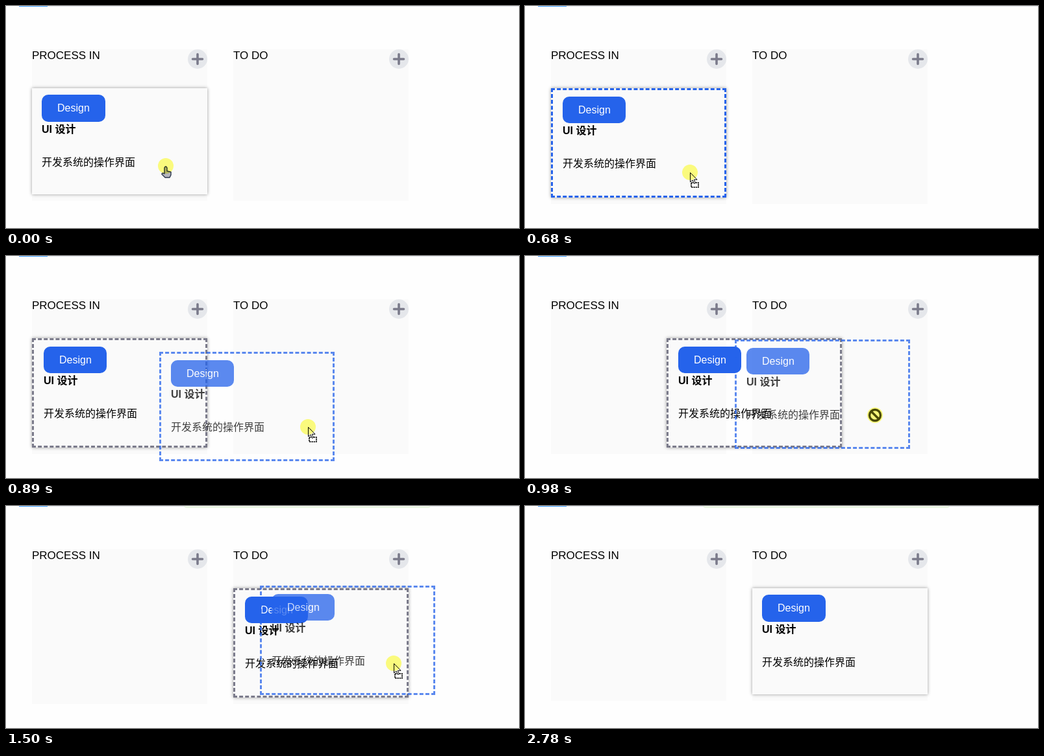
Animation, 790 px wide and 343 px high, one loop 3.24 s. Source, as an HTML page:

```html
<!DOCTYPE html>
<html lang="zh-CN">
<head>
<meta charset="utf-8">
<title>Kanban drag</title>
<style>
  html, body { margin: 0; width: 100%; height: 100%; overflow: hidden; background: #fefefe; }
  body { position: relative; font: 16px "Liberation Sans", Arial, "Noto Sans CJK SC", "Noto Sans CJK", sans-serif; }
  body > * { position: absolute; left: 0; top: 0; }
  svg { overflow: visible; }

  .rule { left: 20px; width: 770px; height: 1px; background: linear-gradient(90deg, #409eff 44px, #e4e7ed 44px); }
  .toast { left: 274px; top: -37px; width: 380px; height: 40px; box-sizing: border-box;
           background: #f0f9eb; border: 1px solid #e1f3d8; border-radius: 4px; }

  .column { top: 67px; width: 270px; height: 234px; background: #fafafa; }
  .column text { font-size: 17px; }
  .column circle { fill: #e5e7eb; }
  .column path { stroke: #7b7b8b; stroke-width: 3.6; stroke-linecap: round; }
  .lifted .column { height: 239px; }

  .card { width: 270px; height: 164px; box-sizing: border-box; box-shadow: 0 0 5px rgba(0, 0, 0, .4); }
  .card svg { position: absolute; left: 0; top: 0; }
  .card rect { fill: #2563eb; width: 98px; height: 42px; }
  .card .label { fill: #fff; }
  .card .title { font-weight: bold; }
  .lifted .card { height: 169px; border: 3px dashed #2563eb; }
  .lifted .card rect { width: 97px; height: 41px; }
  .lifted .card .copy { transform: translateY(-1px); }
  .lifted .card.placeholder { border-color: #7b7b8b; }
  .card.ghost { opacity: .75; box-shadow: none; }

  .halo { left: -12px; top: -12px; width: 24px; height: 24px; border-radius: 50%;
          background: #ffff80; mix-blend-mode: multiply; }
  .pointer > g { display: none; }
  .pointer[data-kind=hand] .hand,
  .pointer[data-kind=drag] .drag,
  .pointer[data-kind=deny] .deny,
  .pointer[data-kind=arrow] .arrow { display: inline; }
  .hand, .arrow { fill: #b4b5be; stroke: #28334a; stroke-width: 1.4; stroke-linejoin: round; }
  .drag { fill: #fff; stroke: #000; }
  .deny { fill: none; stroke: #4a4a10; stroke-width: 3.4; }
</style>
</head>
<body>
<div class="rule"></div>
<div class="column" style="left:40px"><svg width="270" height="60">
  <text y="15">PROCESS IN</text><circle cx="255" cy="15" r="15"/><path d="M247.5 15h15M255 7.500v15"/>
</svg></div>
<div class="column" style="left:350px"><svg width="270" height="60">
  <text y="15">TO DO</text><circle cx="255" cy="15" r="15"/><path d="M247.500 15h15M255 7.500v15"/>
</svg></div>
<div class="card"><svg width="264" height="160">
  <rect x="15" y="10" rx="10"/>
  <text class="label" x="39" y="36">Design</text>
  <g class="copy">
    <text class="title" x="15" y="69">UI 设计</text>
    <text x="15" y="120">开发系统的操作界面</text>
  </g>
</svg></div>
<div class="toast"></div>
<svg class="pointer" width="1" height="1">
  <g class="hand"><path d="M-2 11V3Q0 -1 2 3V8L8 9.500V14L6 18H-1L-6 13Q-6 10 -2 12Z"/></g>
  <g class="drag">
    <rect x="2" y="16" width="11" height="7" stroke-width="1.6" stroke-dasharray="2.500 .8"/>
    <path d="M.5 .5V15L4 12L6.500 17.500L8.500 16.500L6.200 11.300H11Z"/>
  </g>
  <g class="deny"><circle r="8.500"/><path d="M-6 -6L6 6"/></g>
  <g class="arrow"><path d="M.7 .7V15L4 12L6.500 17.500L8.500 16.500L6.200 11.300H10.500Z"/></g>
</svg>
<div class="halo"></div>

<script>
const LOOP = 3240;
const PRESS = 170, DRAG = 680, REST = 1100, DROP = 2370, LEAVE = 2640, GONE = 2780;
const GRAB = { x: 246, y: 247 }, HOME = { x: 40, y: 127 }, END = { x: 597, y: 243 };

// Drag offset knots: time, x, y, then velocity in px per ms.
const KNOTS = [
  [680, 8, 10, .7, .5],
  [800, 118, 35, .95, -.15],
  [980, 293, -1, .35, -.15],
  [1100, 351, -4, 0, 0]
];

const $ = selector => document.querySelector(selector);
const card = $('.card'), pointer = $('.pointer'), halo = $('.halo'), toast = $('.toast');
const ghost = card.cloneNode(true);
ghost.classList.add('ghost');
toast.before(ghost);

const clamp = (v, lo, hi) => Math.min(hi, Math.max(lo, v));
const show = (el, on) => { el.style.visibility = on ? 'visible' : 'hidden'; };
const place = (el, x, y) => { el.style.transform = `translate(${Math.round(x)}px, ${Math.round(y)}px)`; };

function hermite(u, a, va, b, vb) {
  const w = 1 - u;
  return w * w * (1 + 2 * u) * a + u * w * w * va + u * u * (3 - 2 * u) * b - u * u * w * vb;
}

function dragOffset(time) {
  const t = clamp(time, DRAG, REST);
  const i = KNOTS.findIndex((knot, n) => n > 0 && t <= knot[0]);
  const a = KNOTS[i - 1], b = KNOTS[i], span = b[0] - a[0], u = (t - a[0]) / span;
  const axis = k => hermite(u, a[k], a[k + 2] * span, b[k], b[k + 2] * span);
  return { x: axis(1), y: axis(2) };
}

function pointerState(t, step) {
  if (t < DRAG) return { kind: 'hand', ...GRAB };
  if (t < DROP) {
    const d = dragOffset(step);
    return { kind: step >= 950 && step < 1040 ? 'deny' : 'drag', x: GRAB.x + d.x, y: GRAB.y + d.y };
  }
  const p = t < LEAVE ? 0 : (Math.floor((t - LEAVE) / 35) + 1) / 4;
  return { kind: t < GONE ? 'arrow' : 'none', x: END.x - 14 * p, y: END.y + 64 * p };
}

function render(t) {
  const step = clamp(DRAG + Math.floor((t - DRAG) / 30) * 30, DRAG, REST);
  const dragging = t >= DRAG + 30 && t < DROP;

  document.body.classList.toggle('lifted', t >= PRESS && t < DROP);
  card.classList.toggle('placeholder', dragging);
  const slide = 1 - (1 - clamp((step - 930) / 150, 0, 1)) ** 2.1;
  place(card, HOME.x + 310 * slide, HOME.y);

  // The dragged copy trails the pointer slightly.
  const trail = dragOffset(step < REST ? step - 20 : step);
  show(ghost, dragging);
  place(ghost, HOME.x + trail.x, HOME.y + trail.y);

  const { kind, x, y } = pointerState(t, step);
  pointer.dataset.kind = kind;
  place(pointer, x, y);
  place(halo, x, y);
  show(halo, t < DROP);

  toast.style.opacity = t < 1410 ? 0 : t < 1500 ? .5 : 1;
}

const start = performance.now();
function tick() {
  render((performance.now() - start) % LOOP);
  requestAnimationFrame(tick);
}
tick();
</script>
</body>
</html>
```
